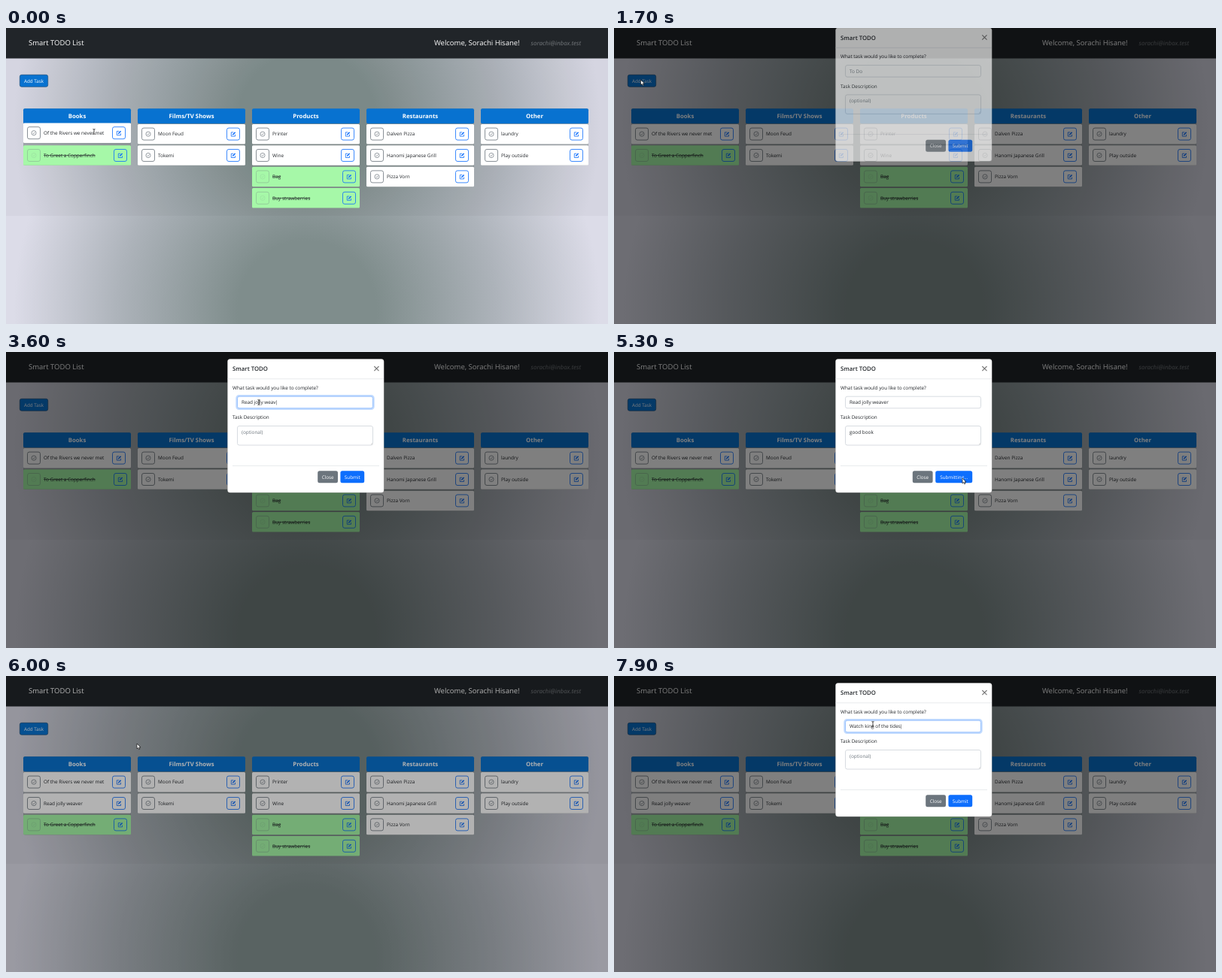
An HTML page for the animation above (8 s loop, 800 by 394 pixels).

```html
<!DOCTYPE html>
<html lang="en">
<head>
<meta charset="utf-8">
<title>Smart TODO List</title>
<style>
html, body { margin: 0; width: 100%; height: 100%; overflow: hidden; background: #7f8d8c; }
svg { display: block; width: 800px; height: 394px; }
text { font-family: "Open Sans", "Noto Sans", sans-serif; text-rendering: geometricPrecision; white-space: pre; }
</style>
</head>
<body>
<svg viewBox="0 0 800 394">
  <defs>
    <radialGradient id="glow" gradientUnits="userSpaceOnUse" cx="400" cy="125" r="419">
      <stop offset=".22" stop-color="#7f8d8c"/>
      <stop offset=".6" stop-color="#adb3ba"/>
      <stop offset=".93" stop-color="#dcdce8"/>
    </radialGradient>
    <g id="tick" fill="none" stroke-width=".7">
      <circle r="3.1"/><path d="M-1.4 0L-.3 1.1L1.5 -1"/>
    </g>
    <g id="pen" fill="none" stroke="#0d6efd" stroke-width=".8">
      <path d="M.3 -2.3H-2.7V3H2.5V.6"/><path d="M-.8 1.1L2.6 -2.4" stroke-width="1.5"/>
    </g>
  </defs>
  <g id="scene"></g>
</svg>
<script>
const LOOP = 8000, STEP = 100;
const BLUE = '#0872d0', INK = '#212529', GREY = '#6c757d';
const scene = document.getElementById('scene');

// Tasks starting with "-" are done.
const columns = [
  ['Books', 'Of the Rivers we never met', '-To Greet a Copperfinch'],
  ['Films/TV Shows', 'Moon Feud', 'Tokemi'],
  ['Products', 'Printer', 'Wine', '-Bag', '-Buy strawberries'],
  ['Restaurants', 'Dalven Pizza', 'Hanomi Japanese Grill', 'Pizza Vorn'],
  ['Other', 'laundry', 'Play outside']
];
const firstTask = 'Read jolly weaver', secondTask = 'Watch king of the tides';

// Pointer path: time, x, y
const path = [
  [0, 117, 138], [300, 112, 135], [900, 58, 94], [1300, 43, 80], [1500, 43, 80],
  [1600, 36, 69], [1800, 35, 69], [2400, 336, 67], [4500, 336, 67], [5000, 463, 168],
  [5300, 463, 168], [5800, 42, 71], [5880, 42, 71], [6000, 174, 90], [6400, 344, 64], [8000, 344, 64]
];

const clamp = v => Math.max(0, Math.min(1, v));
const ramp = (t, start, length) => clamp((t - start) / length);
const easeOut = p => 1 - (1 - p) ** 1.8;
const typed = (s, t, start, rate) => s.slice(0, Math.max(0, Math.floor((t - start) / rate)));

const rect = (x, y, w, h, fill, extra = '') =>
  `<rect x="${x}" y="${y}" width="${w}" height="${h}" fill="${fill}" ${extra}/>`;
const text = (x, y, size, s, fill = INK, extra = '') =>
  `<text x="${x}" y="${y + size * .36}" font-size="${size}" fill="${fill}" ${extra}>${s}</text>`;
const centred = (x, y, size, s, fill, extra = '') =>
  text(x, y, size, s, fill, 'text-anchor="middle" ' + extra);
const button = (x, y, w, label, fill) =>
  rect(x, y, w, 16, fill, 'rx="2.5"') + centred(x + w / 2, y + 8, 6.3, label, '#fff');

function pointer(t) {
  const i = path.findIndex(p => p[0] > t), [t0, x0, y0] = path[i - 1], [t1, x1, y1] = path[i];
  const p = (t - t0) / (t1 - t0), k = p * p * (3 - 2 * p);
  return [x0 + (x1 - x0) * k, y0 + (y1 - y0) * k];
}

function row(x, y, task, lifted) {
  const done = task[0] === '-', label = done ? task.slice(1) : task, shift = done ? 2 : 0;
  return `<g transform="translate(${x} ${y - (lifted ? 1.4 : 0)})">`
    + rect(0, 0, 143, 26.5, done ? '#a6f8a8' : '#fff', 'rx="1.5"')
    + `<g stroke="${GREY}" opacity="${done ? .4 : 1}">`
    + rect(5.5, 5.2, 17, 16, 'none', 'rx="2.5" stroke-width=".8"')
    + `<use href="#tick" x="14" y="13.2" opacity="${done ? .45 : 1}"/></g>`
    + text(27, 13.2, 6.4, label, INK, done ? 'text-decoration="line-through"' : '')
    + rect(118.5 + shift, 5.2, 17, 16, done ? 'none' : '#fff', 'rx="2.5" stroke="#0d6efd" stroke-width=".8"')
    + `<use href="#pen" x="${127 + shift}" y="13.2"/></g>`;
}

function page(t, mx, my) {
  let out = rect(0, 0, 800, 250, 'url(#glow)') + rect(0, 0, 800, 250, '#000', 'opacity=".03"')
    + rect(0, 0, 800, 250, 'url(#glow)', 'transform="translate(0 250)"')
    + rect(0, 0, 800, 40.5, INK)
    + text(30, 19.5, 9.5, 'Smart TODO List', '#fff')
    + text(569, 19.5, 9.5, 'Welcome, Sorachi Hisane!', '#fff')
    + text(697.5, 20, 8, 'sorachi@inbox.test', '#74787c', 'font-style="italic"')
    + rect(18.3, 62.3, 37.4, 16, BLUE, 'rx="2.5" stroke="#24527c" stroke-width=".7"')
    + centred(37, 70.5, 6.3, 'Add Task', '#fff');
  columns.forEach(([title, ...tasks], c) => {
    const x = 23 + c * 152;
    if (c === 0 && t >= 5400) tasks.splice(1, 0, firstTask);
    out += rect(x, 107, 143, tasks.length * 28.4 + 19.2, '#7d8588', 'rx="2.5" opacity=".6"')
      + rect(x, 107.3, 143, 20, BLUE, 'rx="2"')
      + centred(x + 71.5, 117.5, 7.8, title, '#fff', 'font-weight="700"');
    tasks.forEach((task, i) => {
      const y = 127.9 + i * 28.4;
      const over = t < 1500 && mx > x && mx < x + 143 && my > y && my < y + 26;
      out += row(x, y, task, over);
    });
  });
  return out;
}

function field(y, h, value, hint, focused) {
  return (focused ? rect(306.6, y - .4, 181.8, h + .8, 'none', 'rx="3" stroke="#c2dbfe" stroke-width="2.6"') : '')
    + rect(307.5, y + .5, 180, h - 1, '#fff', `rx="2.5" stroke="${focused ? '#86b7fe' : '#ced4da'}" stroke-width=".8"`)
    + text(313, y + 8.3, 6.4,
      (value || (focused ? '' : hint)) + (focused ? '<tspan dx="-1.2" font-size="6.2">|</tspan>' : ''),
      value || focused ? INK : GREY);
}

function modal(t, shown) {
  const again = t > 5700;
  const name = again ? typed(secondTask, t, 6900, 43) : typed(firstTask, t, 2700, 60);
  const note = again ? '' : typed('good book', t, 3950, 60);
  const inName = again ? t >= 6600 : t >= 2500 && t < 3800;
  const inNote = !again && t >= 3800 && t < 5100;
  const sending = !again && t >= 5100;
  const slide = again ? easeOut(ramp(t, 6010, 300))
    : easeOut(ramp(t, 1600, 300)) - ramp(t, 5310, 300);
  return `<g opacity="${shown}" transform="translate(0 ${-20 * (1 - slide)})">`
    + rect(294.3, 9.3, 208, 178, '#fff', 'rx="3.5" stroke="#000" stroke-opacity=".25" stroke-width=".6"')
    + text(301, 22.5, 7.8, 'Smart TODO', INK, 'font-weight="600"')
    + '<path d="M489.3 19l6.2 6.2m0 -6.2l-6.2 6.2" stroke="#777" stroke-width="1.1"/>'
    + rect(294.5, 35.5, 207.5, .7, '#dee2e6')
    + text(301, 47.5, 6.4, 'What task would you like to complete?')
    + field(58.7, 16.6, name, 'To Do', inName)
    + text(301, 87, 6.4, 'Task Description')
    + field(98, 26.5, note, '(optional)', inNote)
    + '<path d="M487 121l-2.2 2.2m2.2 -.8l-.8 .8" stroke="#aaa" stroke-width=".4"/>'
    + rect(301, 151, 195, .7, '#dee2e6')
    + button(sending ? 396.8 : 414.2, 158.3, 26.8, 'Close', GREY)
    + (sending ? button(427.2, 158.3, 49, 'Submitting...', '#0d6efd')
      : button(444.4, 158.3, 31.8, 'Submit', '#0d6efd'))
    + '</g>';
}

function cursor(t, x, y, open) {
  const beam = t < 400 || (open && x > 307 && x < 488 && y > 58 && y < 76);
  return `<g transform="translate(${x} ${y})">` + (beam
    ? '<path d="M-1.5 -3.5Q0 -3.5 0 -2.6Q0 -3.5 1.5 -3.5M0 -3V3M-1.5 3.5Q0 3.5 0 2.6Q0 3.5 1.5 3.5" fill="none" stroke="#222" stroke-width=".8"/>'
    : '<path d="M0 0V6.8L1.6 5.4L2.7 7.8L3.9 7.2L2.8 4.9H5Z" fill="#fff" stroke="#111" stroke-width=".7"/>') + '</g>';
}

function render(t) {
  const [x, y] = pointer(t);
  const shade = t < 5700 ? ramp(t, 1510, 140) - ramp(t, 5360, 150) : ramp(t, 5910, 150);
  const shown = t < 5700 ? ramp(t, 1600, 150) - ramp(t, 5310, 150) : ramp(t, 6010, 150);
  scene.innerHTML = page(t, x, y)
    + rect(0, 0, 800, 394, '#000', `opacity="${shade * .5}"`)
    + (shown > 0 ? modal(t, shown) : '')
    + cursor(t, x, y, shown > .5);
}

let last = -1;
const begin = performance.now();
function tick() {
  // The picture advances in tenths of a second.
  const t = Math.floor((performance.now() - begin) % LOOP / STEP) * STEP;
  if (t !== last) render(last = t);
  requestAnimationFrame(tick);
}
tick();
</script>
</body>
</html>
```
